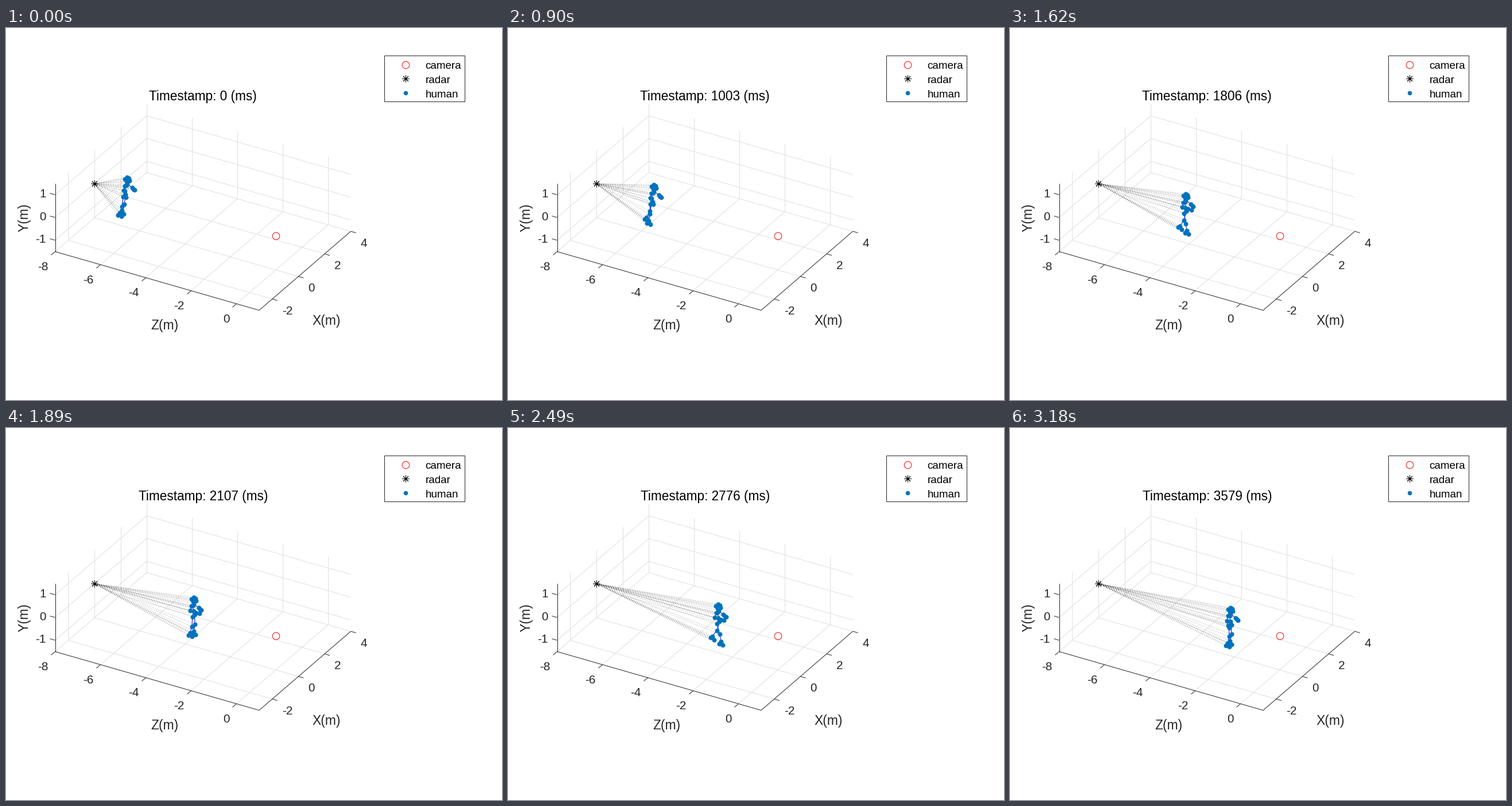
These frames come from a looping animation (864x648 px, 3.21 s). A matplotlib script:

```python
import numpy as np
import matplotlib.pyplot as plt
from matplotlib.animation import FuncAnimation
from matplotlib.collections import LineCollection
from matplotlib.patches import Rectangle

plt.rcParams["font.family"] = "Liberation Sans"

W, H, PX = 864, 648, 0.72          # stage size, points per pixel
FRAMES, STEP = 107, 30
INK, GRID, BLUE = "#262626", "#dfdfdf", "#0072bd"

fig = plt.figure(figsize=(W / 100, H / 100), dpi=100, facecolor="white")
ax = fig.add_axes([0, 0, 1, 1])
ax.set_xlim(0.5, W + 0.5)          # pixels counted from 1
ax.set_ylim(H + 0.5, 0.5)
ax.axis("off")


# --- static scene ---------------------------------------------------------

def project(x, y, z):
    """Room coordinates in metres to pixels."""
    return np.array([86 + 39.5 * (z + 8) + 22.8 * (x + 3),
                     390 + 11.36 * (z + 8) - 19.65 * (x + 3) - 39.6 * (y + 1.5)])


def line(p, q, color, z):
    ax.plot([p[0], q[0]], [p[1], q[1]], color=color, lw=PX, zorder=z,
            solid_capstyle="butt")


def label(x, y, s, size, ha="center", color=INK):
    return ax.text(x, y + 0.358 * size, s, fontsize=size * PX, ha=ha,
                   va="baseline", color=color)


MARKS = {
    "camera": dict(marker="o", ms=12.5 * PX, mfc="none", mec="red", mew=PX),
    "radar": dict(marker=(8, 2, 0), ms=12.5 * PX, mec="black", mew=PX),
    "human": dict(marker="o", ms=7.6 * PX, mfc=BLUE, mec="none"),
}


def mark(x, y, kind):
    ax.plot([x], [y], ls="none", zorder=6, **MARKS[kind])


(x0, y0, z0), (x1, y1, z1) = LO, HI = (-3, -1.5, -8), (4, 1.5, 1)
X_TICKS, Y_TICKS, Z_TICKS = range(-2, 5, 2), range(-1, 2), range(-8, 1, 2)
TICK, AXIS = 20.8, 22.9            # text heights

for x in X_TICKS:
    line(project(x, y0, z0), project(x, y0, z1), GRID, 1)
    line(project(x, y0, z0), project(x, y1, z0), GRID, 1)
    p = project(x, y0, z1)
    line(p, p + (9, 2.6), INK, 2)
    label(p[0] + 17, p[1] + 19, str(x), TICK, "left")
for y in Y_TICKS:
    line(project(x0, y, z0), project(x1, y, z0), GRID, 1)
    line(project(x1, y, z0), project(x1, y, z1), GRID, 1)
    p = project(x0, y, z0)
    line(p, p - (9, 2.6), INK, 2)
    label(p[0] - 16, p[1] - 3, str(y), TICK, "right")
for z in Z_TICKS:
    line(project(x0, y0, z), project(x1, y0, z), GRID, 1)
    line(project(x1, y0, z), project(x1, y1, z), GRID, 1)
    p = project(x0, y0, z)
    line(p, p + (-7, 6), INK, 2)
    label(p[0] - 12, p[1] + 25, str(z), TICK, "right")

front = project(x0, y0, z1)
line(project(*LO), front, INK, 2)
line(front, project(x1, y0, z1), INK, 2)
line(project(*LO), project(x0, y1, z0), INK, 2)

label(276.5, 517, "Z(m)", AXIS)
label(559, 509, "X(m)", AXIS)
ax.text(39, 331, "Y(m)", fontsize=AXIS * PX, color=INK, rotation=90,
        rotation_mode="anchor", ha="center", va="baseline")

ax.add_patch(Rectangle((659, 48), 140, 80, fc="white", ec=INK, lw=PX))
for i, kind in enumerate(MARKS):
    mark(696.5, 64 + 24.6 * i, kind)
    label(731, 65 + 25 * i, kind, 18.75, "left", "black")

RADAR = project(0, 0, -8)
mark(*project(0, 0, 0), "camera")
mark(*RADAR, "radar")


# --- walking figure -------------------------------------------------------

PATH_K = np.array([0, 30, 45, 63, 74, 92, 107])
PATH_X = np.array([211, 254, 286.5, 327, 353.5, 375, 384])
PATH_V = np.gradient(PATH_X, PATH_K)
LAST, STEPS = PATH_K[-1], 8

FORWARD = np.array([1, 0.3])       # walking direction on screen
SIDE = np.array([2, -2])           # from the body's middle to its right
BODY = 62                          # head to ankles

# offsets in pixels from the top of the head
FACE = {"brow": (0, 0), "eye_l": (-4, 3), "eye_r": (3, 2),
        "ear": (4, 6), "chin": (-1, 7), "neck": (-1, 14)}
BONES = [("brow", "eye_l"), ("brow", "eye_r"), ("eye_r", "ear"),
         ("brow", "chin"), ("chin", "neck"), ("neck", "spine")]
for s in "lr":
    for chain in ("neck shoulder elbow wrist hand", "spine hip knee ankle heel",
                  "ankle toe"):
        names = [n if n in ("neck", "spine") else n + s for n in chain.split()]
        BONES += zip(names, names[1:])


def ramp(k, a, b):
    """Eased rise from 0 to 1 between times a and b."""
    u = np.clip((k - a) / (b - a), 0, 1)
    return u * u * (3 - 2 * u)


def path(k):
    """Smooth curve through the path points."""
    i = min(np.searchsorted(PATH_K, k, side="right"), len(PATH_K) - 1) - 1
    h = PATH_K[i + 1] - PATH_K[i]
    u = (k - PATH_K[i]) / h
    rise = u * u * (3 - 2 * u)
    return (PATH_X[i] + (PATH_X[i + 1] - PATH_X[i]) * rise
            + h * u * (1 - u) * ((1 - u) * PATH_V[i] - u * PATH_V[i + 1]))


def pose(k):
    x = path(k)
    gone = (x - PATH_X[0]) / (PATH_X[-1] - PATH_X[0])
    swing = np.sin(np.pi * STEPS * (gone + k / LAST) / 2)
    lean = 8.5 * ramp(k, 25, 65) - 11
    reach = ramp(k, 25, 45) - ramp(k, 92, LAST)

    def below(px, py):
        return np.array([px + lean * py / BODY, py])

    j = {n: np.array(p, float) for n, p in FACE.items()}
    j["spine"] = below(1, 24)
    hands = {"l": ((-6, 23), (12 * reach - 2, 35 - 7 * reach)),
             "r": ((9, 18), (13.5, 22))}
    for s, sign in (("l", -1), ("r", 1)):
        side, stride = sign * SIDE, -sign * swing * FORWARD
        elbow, hand = map(np.array, hands[s])
        j["shoulder" + s] = np.array([-1.5, 12.5]) + side
        j["elbow" + s], j["hand" + s] = elbow, hand
        j["wrist" + s] = elbow + 0.65 * (hand - elbow)
        j["hip" + s] = below(1.5, 32) + side
        j["knee" + s] = below(2, 48.5) + side + 5.5 * stride
        j["ankle" + s] = ankle = below(0, 60) + side + 12 * stride
        j["heel" + s] = ankle + (-3, 4 - 2.5 * max(0, -stride[0]))
        j["toe" + s] = ankle + (3, 6)
    head = np.array([PATH_X[0], 260.5]) + (x - PATH_X[0]) * np.array([1, 0.305])
    return {n: head + p for n, p in j.items()}


rays = LineCollection([], colors="black", linewidths=0.7 * PX, alpha=0.5,
                      linestyles=[(0, (1.4, 2.9))], zorder=3, capstyle="butt")
bones = LineCollection([], colors="blue", linewidths=PX, zorder=4)
ax.add_collection(rays, autolim=False)
ax.add_collection(bones, autolim=False)
dots, = ax.plot([], [], "o", ms=8 * PX, mfc=BLUE, mec="none", zorder=5)
title = label(343.8, 118, "", 22.6, color="black")


def draw(i):
    k = i if i < 100 else i + 1     # one sample is missing from the recording
    joints = pose(k)
    pts = np.array(list(joints.values()))
    rays.set_segments([[RADAR, p] for p in pts])
    bones.set_segments([[joints[a], joints[b]] for a, b in BONES])
    dots.set_data(pts[:, 0], pts[:, 1])
    title.set_text(f"Timestamp: {round(k * 1000 / 29.9)} (ms)")
    return rays, bones, dots, title


anim = FuncAnimation(fig, draw, frames=FRAMES, interval=STEP, repeat=True,
                     repeat_delay=0, blit=False)
plt.show()
```
